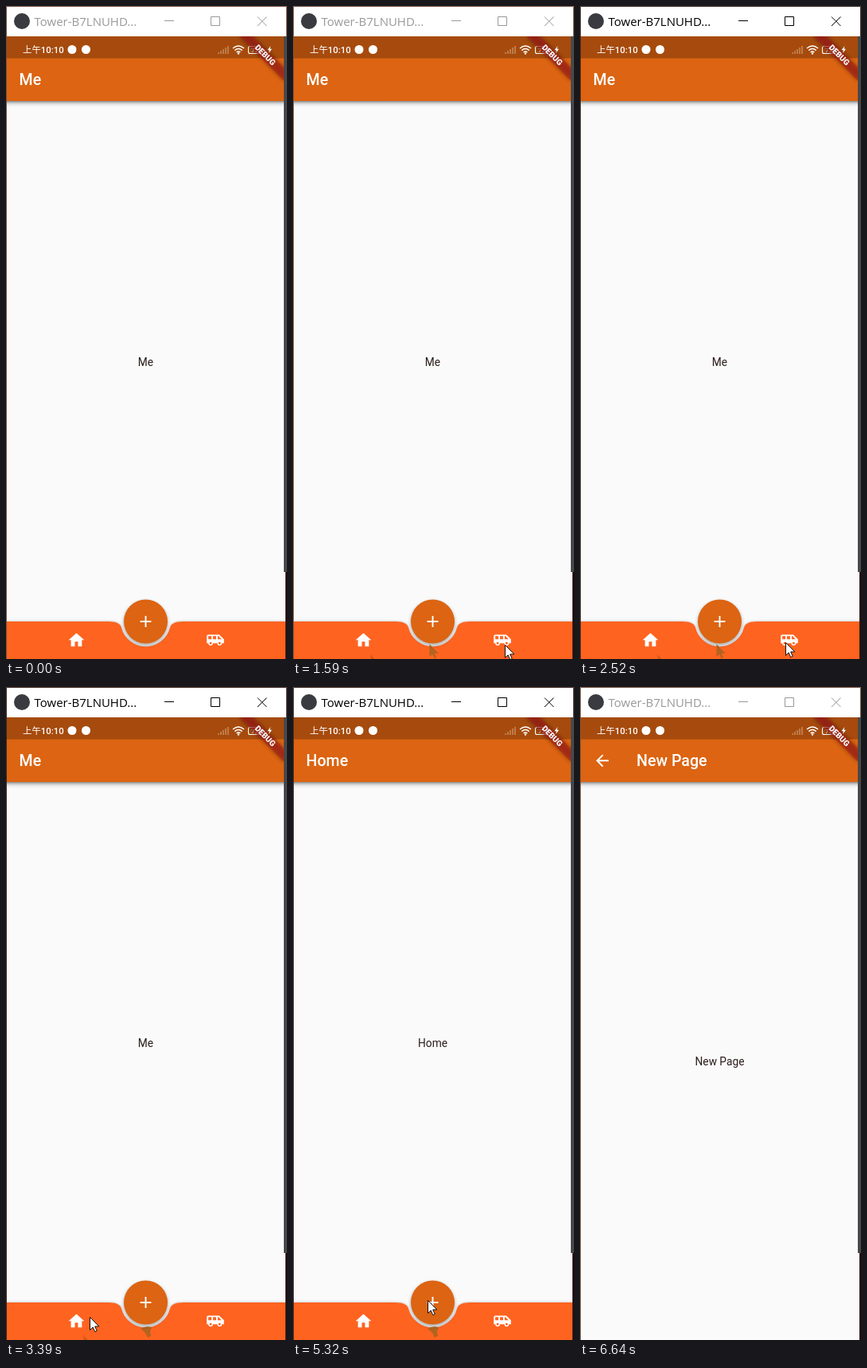
These frames come from a looping animation (353x818 px, 6.71 s). An HTML page:

```html
<!DOCTYPE html>
<html lang="en">
<head>
<meta charset="utf-8">
<title>Notched bottom bar</title>
<style>
  html, body { margin: 0; width: 100%; height: 100%; overflow: hidden; background: #fafafa; }
  svg { display: block; width: 353px; height: 818px; }
  text { font-family: Roboto, "Noto Sans CJK SC", "Noto Sans CJK", sans-serif; }
  .title { font-size: 19.6px; font-weight: 500; fill: #fff; }
  .label { font-size: 13.75px; text-anchor: middle; fill: #2b1d1a; }
  .white { fill: #fff; }
  .ripple { fill: #e0d4cc; }
  #bar { filter: drop-shadow(0 0 1.5px rgba(0, 0, 0, .28)); }
  #fab { filter: drop-shadow(0 2px 2px rgba(0, 0, 0, .35)); }
</style>
</head>
<body>
<svg viewBox="0 0 353 818">
  <defs>
    <linearGradient id="shade" x2="0" y2="1">
      <stop offset="0" stop-opacity=".46"/>
      <stop offset=".3" stop-opacity=".2"/>
      <stop offset=".6" stop-opacity=".06"/>
      <stop offset="1" stop-opacity="0"/>
    </linearGradient>
    <filter id="soft" x="-30%" y="-100%" width="160%" height="300%"><feGaussianBlur stdDeviation="2.6"/></filter>
    <clipPath id="screen"><path d="M1 38h348v671h2v109H1z"/></clipPath>
    <clipPath id="barArea"><path class="barShape"/></clipPath>
    <path id="arrow" d="M.5 .5V16.5L4.2 13 6.7 18.7 9.2 17.6 6.7 12H11.8z"/>
  </defs>

  <rect width="353" height="818" fill="#fafafa"/>
  <g clip-path="url(#screen)">
    <g id="tabs">
      <text id="tabLabel" class="label" x="175.5" y="451">Me</text>
      <path id="bar" class="barShape" fill="#ff6320"/>
      <use id="trailA" href="#arrow" x="97" y="812" fill="#cf5a18"/>
      <use id="trailB" href="#arrow" x="171" y="799" fill="#b3641f"/>
      <path id="trailC" d="M169 804q6-4 14-2l-2 6 1 5-4 2-3-6z" fill="#b3641f"/>
      <g clip-path="url(#barArea)">
        <circle id="vanRipple" class="ripple" cx="264" cy="794"/>
        <circle id="homeRipple" class="ripple" cx="88" cy="794"/>
      </g>
      <g class="white">
        <path transform="translate(76.7 782.5) scale(.982)" d="M10 20v-6h4v6h5v-8h3L12 3 2 12h3v8z"/>
        <path transform="translate(251.2 782.5) scale(.982)" fill-rule="evenodd" d="M17 5H3c-1.1 0-2 .89-2 2v9h2c0 1.65 1.34 3 3 3s3-1.35 3-3h5.5c0 1.65 1.34 3 3 3s3-1.35 3-3H23v-5l-6-6zM3 11V7h4v4H3zm3 6.5a1.5 1.5 0 1 1 0-3 1.5 1.5 0 1 1 0 3zM13 11H9V7h4v4zm4.5 6.5a1.5 1.5 0 1 1 0-3 1.5 1.5 0 1 1 0 3zM15 11V7h1l4 4h-5z"/>
      </g>
      <circle id="fab" cx="175.5" cy="771" r="27.5" fill="#dc6412"/>
      <circle id="fabRipple" class="ripple" cx="169" cy="768"/>
      <path d="M168.6 771h13.8M175.5 764.1v13.8" stroke="#fff" stroke-width="1.9"/>
    </g>
    <text id="newLabel" class="label" x="175.5" y="474">New Page</text>

    <rect y="119" width="353" height="8" fill="url(#shade)"/>
    <rect y="65" width="353" height="54" fill="#dc6412"/>
    <rect y="38" width="353" height="27.5" fill="#a64b0d"/>
    <text id="tabTitle" class="title" x="16.5" y="99">Me</text>
    <g id="newTitle">
      <path class="white" transform="translate(16.3 80.5) scale(.982)" d="M20 11H7.83l5.59-5.59L12 4l-8 8 8 8 1.41-1.41L7.83 13H20z"/>
      <text class="title" x="71" y="99">New Page</text>
    </g>

    <text class="white" x="21" y="58.8" font-size="11.4" font-weight="500">上午10:10</text>
    <circle class="white" cx="83" cy="54.5" r="5.5"/>
    <circle class="white" cx="100.5" cy="54.5" r="5.5"/>
    <path d="M267 60v-2M270 60v-4M273 60v-6M276 60v-8M279 60v-10" stroke="#c98a58" stroke-width="1.5"/>
    <g fill="none" stroke="#fff" stroke-width="1.4">
      <path d="M285 53q7-6 14 0M287.3 55.6q4.7-4 9.4 0M289.6 58q2.4-2 4.8 0"/>
      <rect x="304.5" y="50.5" width="16" height="9" rx="2" stroke-width="1.1"/>
      <path d="M322.5 53.5v3"/>
    </g>
    <circle class="white" cx="292" cy="59.5" r="1.2"/>
    <text class="white" x="312.5" y="58" font-size="8" text-anchor="middle">72</text>

    <g transform="translate(349 38) rotate(45)">
      <rect x="-39" y="27.5" width="78" height="11.8" opacity=".4" filter="url(#soft)"/>
      <rect x="-39" y="27.5" width="78" height="11.8" fill="#b71c1c" opacity=".55"/>
      <text class="white" y="36.5" font-size="10" font-weight="900" text-anchor="middle">DEBUG</text>
    </g>
    <path class="white" d="M332.5 50l-4 5.3h2.5l-1 4 4-5.5h-2.5z"/>
  </g>

  <rect x="1" y="1" width="351" height="37" fill="#fff"/>
  <circle cx="20" cy="19" r="10" fill="#3a3b40"/>
  <g id="caption">
    <text x="35.5" y="24.5" fill="currentColor" style="font: 15px 'Open Sans', 'Noto Sans', sans-serif">Tower-B7LNUHD...</text>
    <path d="M199 18.5h12M257.5 13.5h11v11h-11zM316 13.5l11.5 11.5M327.5 13.5L316 25" fill="none" stroke="currentColor"/>
  </g>
  <path d="M349 38h4v671h-4z" fill="#48484a"/>
  <path d="M351 709h2v109h-2z" fill="#2c1414"/>
  <path id="frame" d="M.5 818V.5H352.5V38" fill="none"/>
  <use id="cursor" href="#arrow" fill="#fff" stroke="#111" stroke-width="1"/>
</svg>
<script type="module">
  const LOOP = 6710, TICK = 66.43;
  const $ = id => document.getElementById(id);

  // Circular notch: shoulders curve into an arc around the round button.
  const cx = 175.5, barTop = 771, radius = 31.5, edge = radius + 1, reach = edge + 14.7;
  const dipX = radius * radius / edge, dipY = Math.sqrt(radius * radius - dipX * dipX);
  const notch = `M1 ${barTop}H${cx - reach}Q${cx - edge} ${barTop} ${cx - dipX} ${barTop + dipY}` +
    `A${radius} ${radius} 0 0 0 ${cx + dipX} ${barTop + dipY}` +
    `Q${cx + edge} ${barTop} ${cx + reach} ${barTop}H351V818H1z`;
  document.querySelectorAll('.barShape').forEach(p => p.setAttribute('d', notch));

  // Rows: tick, then values to interpolate.
  const cursorPath = [
    [10, 97, 812], [15, 171, 801], [20, 222, 797], [24, 266, 800], [27, 258, 797],
    [39, 258, 797], [42, 222, 798], [46, 150, 794], [50, 107, 789], [51, 105, 789],
    [56, 89, 790], [66, 89, 790], [71, 128, 781], [77, 169, 768],
    [91, 169, 768], [92, 212, 784], [93, 285, 808]
  ];
  // Radius and opacity of each touch ripple.
  const vanInk = [[28, 8, .2], [32, 30, .28], [35, 35, .2], [38, 36, 0]];
  const homeInk = [[58, 10, .2], [60, 24, .28], [61, 31, .24], [63, 34, .08], [64, 34, 0]];
  const fabInk = [[78, 14.5, .25], [80, 14.5, .25]];

  function sample(rows, tick) {
    const i = rows.findIndex(row => row[0] > tick);
    if (i < 0) return rows[rows.length - 1].slice(1);
    if (i === 0) return rows[0].slice(1);
    const a = rows[i - 1], b = rows[i], u = (tick - a[0]) / (b[0] - a[0]);
    return a.slice(1).map((v, k) => v + (b[k + 1] - v) * u);
  }

  const show = (id, on) => { $(id).style.display = on ? '' : 'none'; };

  function ripple(id, rows, tick) {
    const on = tick >= rows[0][0] && tick < rows[rows.length - 1][0];
    show(id, on);
    if (!on) return;
    const [r, opacity] = sample(rows, tick);
    $(id).setAttribute('r', r);
    $(id).setAttribute('opacity', opacity);
  }

  function render(time) {
    const tick = Math.floor((time % LOOP + 6) / TICK) % 101;
    const active = tick >= 28 && tick < 100;
    const page = tick >= 60 ? 'Home' : 'Me';
    const pushed = tick >= 86;

    $('caption').style.color = active ? '#000' : '#999';
    $('frame').style.stroke = active ? '#3c2620' : '#76503c';
    $('tabLabel').textContent = $('tabTitle').textContent = page;
    for (const id of ['tabs', 'tabTitle']) show(id, !pushed);
    for (const id of ['newLabel', 'newTitle']) show(id, pushed);
    $('newTitle').style.opacity = tick < 88 ? .75 : 1;

    show('trailA', tick > 10 && tick < 58);
    show('trailB', tick > 15 && tick < 44);
    show('trailC', tick >= 44);
    ripple('vanRipple', vanInk, tick);
    ripple('homeRipple', homeInk, tick);
    ripple('fabRipple', fabInk, tick);

    show('cursor', tick >= 10 && tick < 94);
    const [x, y] = sample(cursorPath, tick).map(Math.round);
    $('cursor').setAttribute('transform', `translate(${x} ${y})`);
  }

  const start = performance.now();
  function loop() {
    render(performance.now() - start);
    requestAnimationFrame(loop);
  }
  loop();
</script>
</body>
</html>
```
